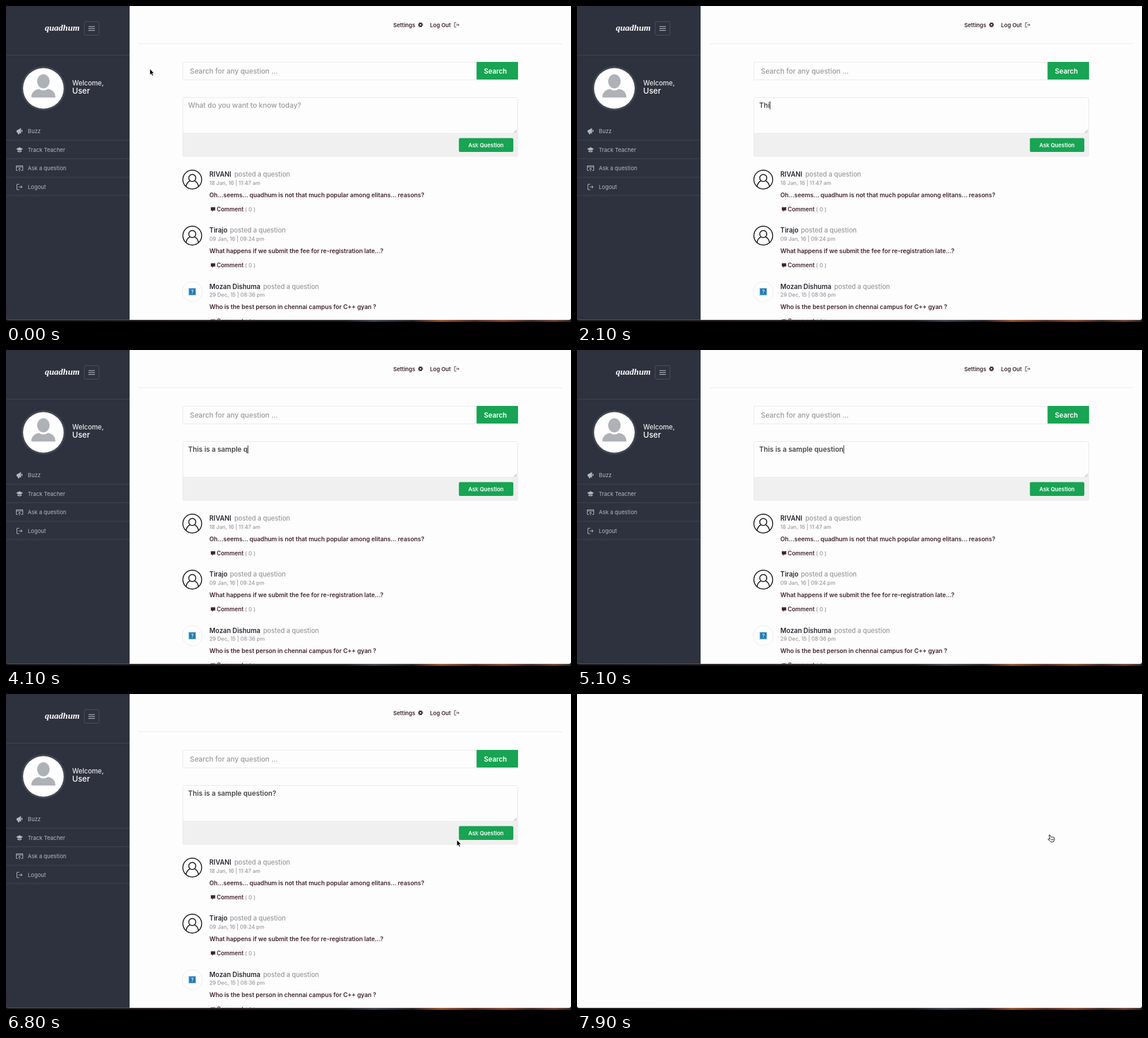
Animation, 960 px wide and 537 px high, one loop 8000 ms. Source, as an HTML page:

```html
<!DOCTYPE html>
<html lang="en">
<head>
<meta charset="utf-8">
<title>Ask a question</title>
<style>
  html, body { margin: 0; width: 100%; height: 100%; overflow: hidden; background: #fefdfe; }
  svg { display: block; width: 960px; height: 537px; }
  text { font-family: Inter, "Open Sans", sans-serif; font-weight: 500; white-space: pre; }
  .logo { font: italic bold 15px "Liberation Serif", serif; fill: #fff; }
  .menu { font-size: 9.4px; font-weight: 400; fill: #b4b7bd; }
  .top { font-size: 9.35px; font-weight: 600; fill: #3a262e; }
  .field { font-size: 11.9px; }
  .hint { fill: #9b9b9d; }
  .written { font-size: 11.75px; font-weight: 600; fill: #48484b; }
  .label { font-weight: 600; fill: #fff; }
  .name { font-size: 11.2px; font-weight: 600; fill: #2b2a33; }
  .grey { font-weight: 500; fill: #98989b; }
  .ask { font-size: 10.2px; font-weight: 600; fill: #43242f; }
  .line { fill: none; stroke: #e9e9ea; }
  .rule { stroke: #40444f; }
  .icon { fill: none; stroke: #b4b7bd; }
  .solid { fill: #b4b7bd; }
</style>
</head>
<body>
<svg viewBox="0 0 960 537">
  <defs>
    <linearGradient id="desk">
      <stop offset="0" stop-color="#0b0a0d"/><stop offset=".3" stop-color="#1c1216"/>
      <stop offset=".6" stop-color="#19171c"/><stop offset=".65" stop-color="#343a46"/>
      <stop offset=".72" stop-color="#221a1c"/><stop offset=".77" stop-color="#97461f"/>
      <stop offset=".83" stop-color="#4a2318"/><stop offset=".88" stop-color="#843c20"/>
      <stop offset=".93" stop-color="#38201c"/><stop offset=".97" stop-color="#6a3822"/>
      <stop offset="1" stop-color="#2a2122"/>
    </linearGradient>
    <clipPath id="window"><rect y="-10" width="960" height="543.5" rx="4"/></clipPath>
    <g id="exit"><path d="M4.5 .5H.5V9.5H4.5M3.5 5H9.5M7 2.5L9.5 5L7 7.5"/></g>
    <g id="person" fill="none" stroke="#111" stroke-width="1.5">
      <circle r="16"/><circle cy="-2.8" r="6"/>
      <path d="M-10.5 12C-10 7-7.500 4-4 2.200M10.500 12C10 7 7.500 4 4 2.200"/>
    </g>
    <g id="missing">
      <circle r="17" fill="none" stroke="#ebebec"/>
      <rect x="-6.5" y="-6.5" width="13" height="13" fill="#a5cde6"/>
      <rect x="-5.3" y="-5.3" width="10.6" height="10.6" fill="#2079b3"/>
      <text y="3.3" text-anchor="middle" font-size="9" fill="#fff">?</text>
    </g>
    <path id="stem" d="M-2.5-6Q0-6 0-4.5Q0-6 2.5-6M0-5V5M-2.5 6Q0 6 0 4.5Q0 6 2.5 6M-1.5 2H1.5"/>
  </defs>

  <rect y="525" width="960" height="12" fill="url(#desk)"/>
  <g clip-path="url(#window)">
    <rect width="960" height="534" fill="#fefdfe"/>
    <g id="page">
      <rect width="210" height="534" fill="#2e323e"/>
      <path class="rule" d="M0 83.5H210M0 228H210M0 259.5H210M0 291H210M0 322H210"/>
      <text class="logo" x="66" y="42">quadhum</text>
      <rect x="133" y="26.5" width="25" height="23" rx="2" fill="none" stroke="#4b505b"/>
      <path d="M140 35H151M140 38.3H151M140 41.6H151" stroke="#c9cbd0"/>

      <circle cx="63.5" cy="140" r="37.5" fill="#434751"/>
      <circle cx="63.5" cy="140" r="34.5" fill="#fefefe"/>
      <g fill="#aeb2b6">
        <ellipse cx="63.5" cy="128" rx="10.5" ry="12"/>
        <path d="M43 155.500C43 146 50 142 56 141Q63.5 146 71 141C78 142 84 146 84 155.500Z"/>
      </g>
      <text x="112.5" y="135" font-size="11.3" fill="#e6e7ea">Welcome,</text>
      <text x="112.5" y="149" font-size="13.4" fill="#fff">User</text>

      <path class="solid" d="M18 211.5L25.5 207.5V217L22 215.5L23 218H20.5L19.5 215L18 214.5ZM26.5 210.5H28V214H26.5Z"/>
      <path class="solid" d="M17 243L23 240L29 243L23 246ZM19.5 245.3L23 247L26.5 245.3V247.5Q23 249.5 19.5 247.5Z"/>
      <path class="icon" d="M20 279.5H17.5V271.5H28.5V279.5H26M17.5 273.5H28.5M23 281V275.5M20.8 277.7L23 275.5L25.2 277.7"/>
      <use href="#exit" x="18" y="302.5" class="icon"/>
      <text class="menu" x="37" y="216">Buzz</text>
      <text class="menu" x="37" y="247.5">Track Teacher</text>
      <text class="menu" x="37" y="279">Ask a question</text>
      <text class="menu" x="37" y="310.5">Logout</text>

      <text class="top" x="658" y="35.5">Settings</text>
      <g fill="none" stroke="#3a262e">
        <circle cx="704.3" cy="32" r="2.3" stroke-width="2"/>
        <circle cx="704.3" cy="32" r="3.7" stroke-width="1.2" stroke-dasharray="1.45"/>
        <use href="#exit" transform="translate(761.5 27.8) scale(.85)"/>
      </g>
      <text class="top" x="720.5" y="35.5">Log Out</text>
      <path class="line" d="M225 64H945"/>

      <rect class="line" x="300.5" y="95.5" width="500" height="30"/>
      <text class="field hint" x="312.5" y="114.5">Search for any question ...</text>
      <rect x="799.5" y="95" width="70.5" height="30" rx="1" fill="#18a453"/>
      <text class="label" font-size="11.5" x="812" y="114.5">Search</text>

      <rect class="line" x="300.5" y="155.5" width="569" height="100" rx="1"/>
      <rect x="301" y="217" width="568" height="38" fill="#f0f0f0"/>
      <path class="line" d="M300 216.5H870"/>
      <path d="M863 215.5L868 210.5M866 215.5L868 213.5" stroke="#777" stroke-width=".8"/>
      <text id="typed" x="309.5" y="173"></text>
      <path id="caret" d="M0 162V176" stroke="#222"/>
      <rect id="button" x="769.5" y="224.5" width="92.5" height="23.5" rx="2"/>
      <text class="label" x="815.5" y="240" text-anchor="middle" font-size="9.3">Ask Question</text>
      <g id="posts"></g>
    </g>
    <path d="M0 .5H960" stroke="#000" stroke-opacity=".05"/>
  </g>

  <g id="arrow">
    <path d="M0 0V10.5L2.4 8.3L4 12L5.9 11.2L4.3 7.6H7.5Z" stroke="#fff" stroke-width=".8"/>
  </g>
  <g id="beam" fill="none">
    <use href="#stem" stroke="#fff" stroke-width="2.4" stroke-opacity=".8"/>
    <use href="#stem" stroke="#111" stroke-width="1.1"/>
  </g>
  <g id="hand" stroke="#111">
    <path d="M0 .8Q1-.5 2 .8L3.7 4.2Q4.6 3.3 5.4 4Q6.4 3.4 7.1 4.2Q8.7 3.8 9 6Q9.3 9 8 11.5L3.5 12.5Q1.5 10-1.5 8Q-1.8 6.5 0 6.6L1.6 7.4Z" fill="#fff"/>
    <path d="M3.8 7V9.5M5.4 6.8V9.3M7 6.5V9" stroke-width=".7"/>
  </g>
</svg>
<script>
const $ = id => document.getElementById(id);

const posts = [
  ['person', 'RIVANI', 388, '18 Jan, 16 | 11:47 am', 'Oh...seems... quadhum is not that much popular among elitans... reasons?'],
  ['person', 'Tirajo', 380.5, '09 Jan, 16 | 09:24 pm', 'What happens if we submit the fee for re-registration late...?'],
  ['missing', 'Mozan Dishuma', 437, '29 Dec, 15 | 08:36 pm', 'Who is the best person in chennai campus for C++ gyan ?']
];
$('posts').innerHTML = posts.map(([face, name, x, date, question], i) => `
  <g transform="translate(0 ${i * 95.25})">
    <use href="#${face}" x="316.5" y="295"/>
    <text class="name" x="345.5" y="290">${name}</text>
    <text class="grey" font-size="11.1" x="${x}" y="290">posted a question</text>
    <text class="grey" font-size="9" x="345.5" y="303.5">${date}</text>
    <text class="ask" x="345.5" y="324.5">${question}</text>
    <path d="M348 342H355.5V347.5H352L350 349.5V347.5H348Z" fill="#43242f"/>
    <text class="ask" style="font-size:9.7px" x="358" y="348.5">Comment</text>
    <text class="grey" font-size="9.4" x="406" y="348.5">( 0 )</text>
  </g>`).join('');

const LOOP = 8000, STEP = 100, KEY = 2000 / 15;
const TYPE = 1700, FOCUS = 1100, LEAVE = 5300, CLICK = 7500, BLANK = 7700;
const message = 'This is a sample question?';
const typeEnd = TYPE + message.length * KEY;

// Pointer stops: time, x, y
const stops = [
  [100, 244.3, 106.8], [700, 362, 170], [LEAVE, 362, 170],
  [6100, 688.3, 266.8], [6300, 688.3, 266.8], [7100, 802, 239.3]
];

function pointer(t) {
  const i = stops.findIndex(s => s[0] > t);
  if (i === 0) return stops[0].slice(1);
  if (i < 0) return stops[stops.length - 1].slice(1);
  const [t0, x0, y0] = stops[i - 1], [t1, x1, y1] = stops[i];
  const k = (t - t0) / (t1 - t0), e = k * k * (3 - 2 * k);
  return [x0 + (x1 - x0) * e, y0 + (y1 - y0) * e];
}

const inside = (x, y, l, t, r, b) => x >= l && x <= r && y >= t && y <= b;
const show = (id, on) => $(id).style.display = on ? '' : 'none';

function draw(t) {
  const count = Math.max(0, Math.min(message.length, Math.floor((t - TYPE) / KEY + 1e-6)));
  const typed = $('typed');
  typed.textContent = count ? message.slice(0, count) : 'What do you want to know today?';
  typed.setAttribute('class', count ? 'written' : 'field hint');

  const typing = count > 0 && t < typeEnd;
  const since = t - (t < typeEnd ? FOCUS : typeEnd);
  show('caret', t >= FOCUS && t < CLICK && (typing || since % 1000 < 500));
  const end = 310 + (count ? typed.getComputedTextLength() : 0);
  $('caret').setAttribute('transform', `translate(${end} 0)`);

  const [x, y] = pointer(t);
  const onButton = inside(x, y, 770, 225, 861, 248);
  const onField = inside(x, y, 300, 155, 870, 217) || inside(x, y, 300, 95, 800, 125);
  const kind = onButton ? 'hand' : onField ? 'beam' : 'arrow';
  const hidden = count > 0 && t < LEAVE;
  for (const id of ['arrow', 'beam', 'hand']) {
    show(id, id === kind && !hidden);
    $(id).setAttribute('transform', `translate(${x} ${y})`);
  }
  $('button').setAttribute('fill', onButton ? '#10773c' : '#18a453');
  show('page', t < BLANK);
}

const start = performance.now();
function frame() {
  const t = (performance.now() - start) % LOOP;
  draw(Math.floor(t / STEP) * STEP);
  requestAnimationFrame(frame);
}
frame();
</script>
</body>
</html>
```
